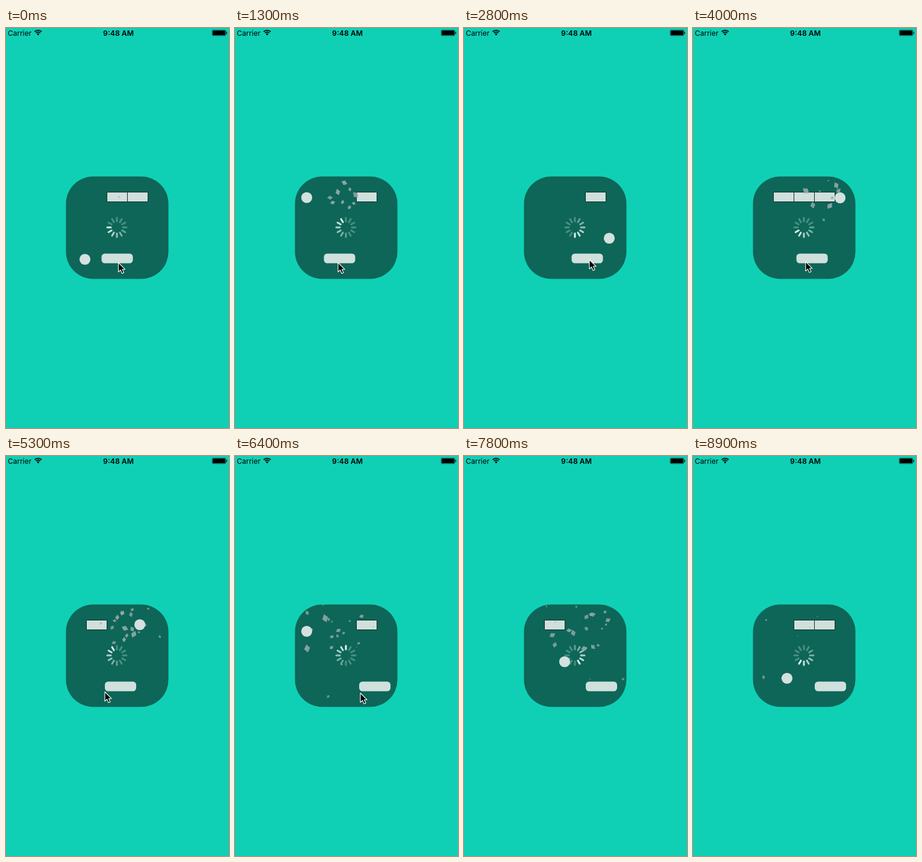
An HTML page with a canvas for the animation above (9 s loop, 370 px wide and 664 px high).

```html
<!DOCTYPE html>
<html lang="en">
<head>
<meta charset="utf-8">
<title>Brick loader</title>
<style>
html, body { margin: 0; width: 370px; height: 664px; overflow: hidden; background: #0fd0b5; }
canvas { position: absolute; left: 0; top: 0; display: block; }
.bar { position: absolute; top: 0; line-height: 17px; font-family: Inter, Roboto, sans-serif; color: #000; white-space: nowrap; }
.left { left: 3px; font-size: 12px; }
.mid { left: 86.5px; width: 200px; text-align: center; font-size: 12.2px; font-weight: 600; }
</style>
</head>
<body>
<canvas id="stage" width="370" height="664"></canvas>
<div class="bar left">Carrier</div>
<div class="bar mid">9:48 AM</div>
<script>
const ctx = document.getElementById('stage').getContext('2d');
const LOOP = 9000, STEP = 100;
const BOX = { x: 99.5, y: 246.5, size: 170, r: 45 };
const ROOM = { x: 108.5, y: 255.5, w: 152, h: 130 };
const BRICK = { x: 133.5, y: 272.5, w: 34, h: 16 };
const PALE = '#cfe0dd';

// Ball travel (u, v) is unfolded: it only grows, and fold() mirrors it off the walls.
const poses = [
  { t: 0, u: 281.5, v: 131.5, paddle: 158.5, px: 186.5, py: 389.5, spin: 9 },
  { t: 1300, u: 597.5, v: 234, paddle: 147.5, px: 171, py: 389.5, spin: 23 },
  { t: 2800, u: 779.5, v: 613.5, paddle: 178.5, px: 208, py: 384.5, spin: 42 },
  { t: 5300, u: 1406.5, v: 1015.5, paddle: 164, px: 164, py: 391.5, spin: 71 },
  { t: 6400, u: 1530.5, v: 1264.5, paddle: 206, px: 208, py: 393.5, spin: 84 },
  { t: 7800, u: 1765.5, v: 1474, paddle: 202, px: 265, py: 505, spin: 101 },
  { t: 8900, u: 1871.5, v: 1706.5, paddle: 202, px: 265, py: 505, spin: 115 }
];
const POINTER_END = 7700;

// [time, brick]; the row refills once all three are gone
const hits = [
  [-800, 0], [1110, 1], [3680, 2], [5030, 2], [5060, 1], [5440, 0],
  [5980, 1], [6050, 0], [6820, 2], [7410, 2], [7450, 1], [8000, 0], [8060, 0]
];
const shards = hits.flatMap(([t0, brick], n) => Array.from({ length: 9 }, (_, i) => makeShard(t0, brick, n * 9 + i)));

function rand(n) {
  const v = Math.sin(n * 127.1 + 31.7) * 43758.5453;
  return v - Math.floor(v);
}

function makeShard(t0, brick, seed) {
  const angle = seed * 2.4, speed = 30 + 130 * rand(seed);
  return {
    t0,
    x: BRICK.x + (brick + 0.5) * BRICK.w,
    y: BRICK.y + BRICK.h / 2,
    vx: Math.cos(angle) * speed / 1000,
    vy: Math.sin(angle) * speed / 1000,
    size: 9 + 10 * rand(seed + 200),
    life: 500 + 1300 * rand(seed + 400) ** 2,
    turn: rand(seed + 600) * 6.3,
    spin: (rand(seed + 800) - 0.5) * 0.006
  };
}

function fold(d, size) {
  const m = d % (2 * size);
  return m > size ? 2 * size - m : m;
}

function poseAt(t) {
  const i = Math.min(poses.length - 1, poses.findIndex(p => p.t >= t));
  if (i <= 0) return poses[0];
  const a = poses[i - 1], b = poses[i], f = (t - a.t) / (b.t - a.t), pose = {};
  for (const k in a) pose[k] = a[k] + (b[k] - a[k]) * f;
  return pose;
}

function bricksAt(t) {
  let row = new Set([0, 1, 2]);
  for (const [time, brick] of hits) {
    if (time > t) break;
    row.delete(brick);
    if (!row.size) row = new Set([0, 1, 2]);
  }
  return row;
}

function roundRect(x, y, w, h, r) {
  ctx.beginPath();
  ctx.roundRect(x, y, w, h, r);
}

function poly(points) {
  ctx.beginPath();
  points.forEach(([x, y]) => ctx.lineTo(x, y));
  ctx.closePath();
}

function drawStatus() {
  ctx.fillStyle = ctx.strokeStyle = '#000';
  ctx.lineWidth = 1.8;
  ctx.lineCap = 'butt';
  for (const r of [8.2, 5.1]) {
    ctx.beginPath();
    ctx.arc(53.3, 12, r, -Math.PI * 0.75, -Math.PI * 0.25);
    ctx.stroke();
  }
  ctx.beginPath();
  ctx.moveTo(53.3, 12.6);
  ctx.arc(53.3, 12, 2.9, -Math.PI * 0.75, -Math.PI * 0.25);
  ctx.fill();
  ctx.lineWidth = 0.5;
  roundRect(342, 3.3, 22.8, 9.6, 2);
  ctx.stroke();
  roundRect(342.9, 4.2, 21, 7.8, 1.2);
  ctx.fill();
  roundRect(365.4, 6.3, 1.3, 3.6, 0.6);
  ctx.fill();
}

function drawSpinner(step) {
  const head = Math.round(step) % 12;
  ctx.lineWidth = 3;
  ctx.lineCap = 'round';
  for (let i = 0; i < 12; i++) {
    const behind = (head - i + 12) % 12, a = i * Math.PI / 6;
    const dx = Math.sin(a), dy = -Math.cos(a);
    ctx.strokeStyle = `rgba(230,250,246,${Math.max(0.28, 0.95 - behind * 0.11)})`;
    ctx.beginPath();
    ctx.moveTo(184 + dx * 10, 331 + dy * 10);
    ctx.lineTo(184 + dx * 16, 331 + dy * 16);
    ctx.stroke();
  }
}

function drawBricks(t) {
  ctx.fillStyle = PALE;
  ctx.strokeStyle = '#122c26';
  ctx.lineWidth = 1;
  for (const i of bricksAt(t)) {
    ctx.beginPath();
    ctx.rect(BRICK.x + i * BRICK.w, BRICK.y, BRICK.w, BRICK.h);
    ctx.fill();
    ctx.stroke();
  }
}

function drawShard(s, t) {
  const age = t - s.t0, left = 1 - age / s.life;
  if (age < 0 || left <= 0) return;
  const size = s.size * left;
  ctx.save();
  ctx.translate(s.x + s.vx * age, s.y + s.vy * age);
  ctx.rotate(s.turn + s.spin * age);
  ctx.scale(size, size * 0.75);
  ctx.globalAlpha = 0.4 + 0.5 * left;
  ctx.fillStyle = '#a3b3b3';
  poly([[-0.5, -0.12], [0.02, -0.5], [0.5, 0.1], [-0.02, 0.5]]);
  ctx.fill();
  ctx.fillStyle = '#8d9fa0';
  poly([[-0.5, -0.12], [0.1, 0.05], [-0.02, 0.5]]);
  ctx.fill();
  ctx.restore();
}

function drawPointer(x, y) {
  ctx.save();
  ctx.translate(x, y);
  poly([[0, 0], [0, 15.5], [3.6, 12.2], [6.1, 18], [9, 16.7], [6.5, 11.2], [11, 11.2]]);
  ctx.fillStyle = '#000';
  ctx.strokeStyle = '#fff';
  ctx.lineWidth = 1.1;
  ctx.lineJoin = 'round';
  ctx.fill();
  ctx.stroke();
  ctx.restore();
}

function draw(t) {
  const pose = poseAt(t);
  ctx.fillStyle = '#0fd0b5';
  ctx.fillRect(0, 0, 370, 664);
  drawStatus();

  ctx.save();
  roundRect(BOX.x, BOX.y, BOX.size, BOX.size, BOX.r);
  ctx.fillStyle = '#0d6657';
  ctx.fill();
  ctx.clip();
  drawBricks(t);
  ctx.fillStyle = PALE;
  roundRect(pose.paddle, 374.5, 52, 16, 5.5);
  ctx.fill();
  drawSpinner(pose.spin);
  shards.forEach(s => drawShard(s, t));
  ctx.fillStyle = '#d3e1df';
  ctx.beginPath();
  ctx.arc(ROOM.x + fold(pose.u, ROOM.w), ROOM.y + fold(pose.v, ROOM.h), 9.1, 0, Math.PI * 2);
  ctx.fill();
  ctx.restore();

  if (t < POINTER_END) drawPointer(pose.px, pose.py);
}

const start = performance.now();
function tick() {
  const t = (performance.now() - start) % LOOP;
  draw(Math.floor(t / STEP) * STEP);
  requestAnimationFrame(tick);
}
tick();
</script>
</body>
</html>
```
